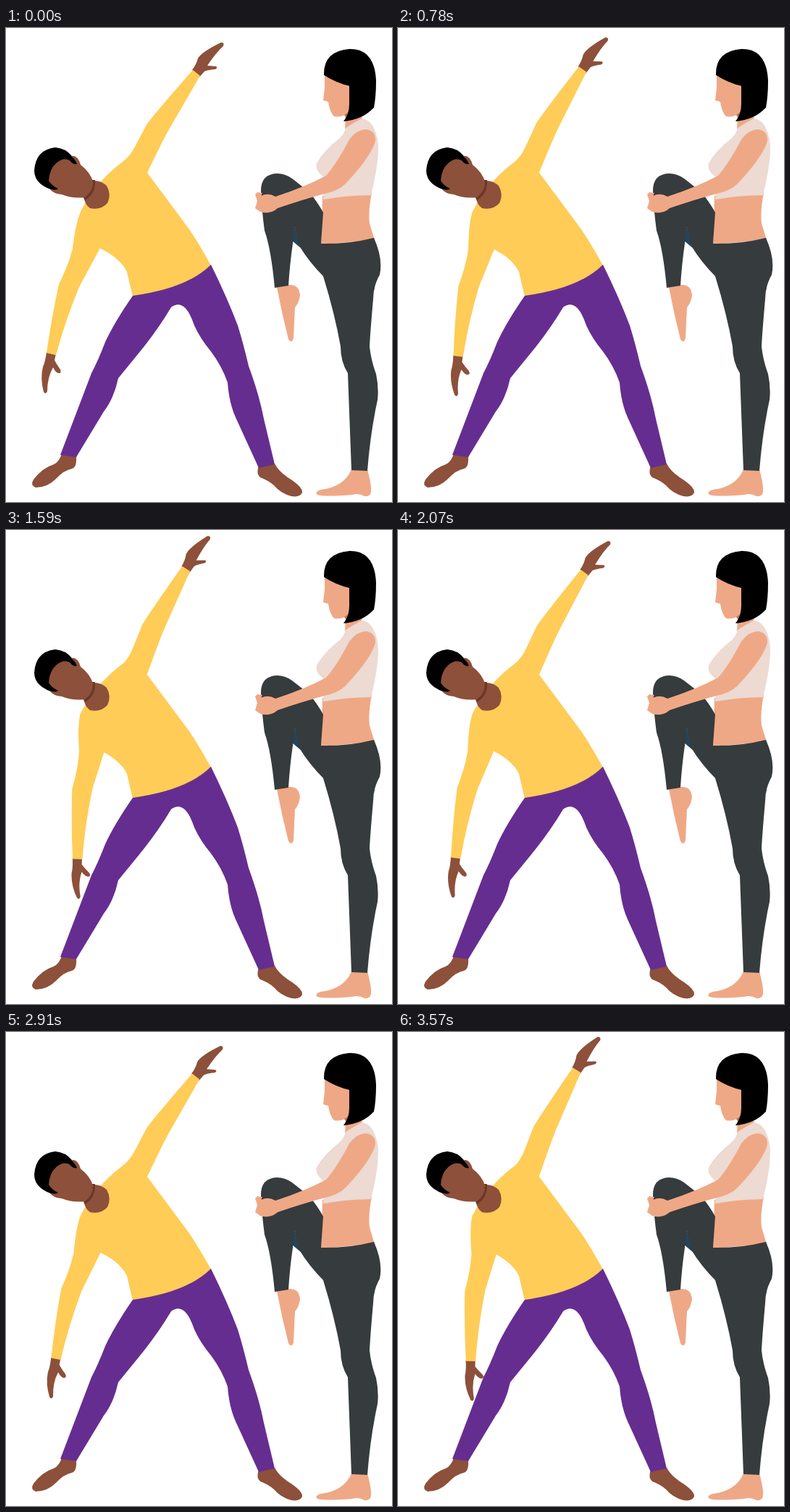
An HTML page that plays this animation: 533x655 px, repeating every 3600 ms.

```html
<!DOCTYPE html>
<html lang="en">
<head>
<meta charset="utf-8">
<title>Stretching</title>
<style>
  html, body { margin: 0; width: 100%; height: 100%; overflow: hidden; background: #fff; }
  svg { display: block; }
  .brown { fill: #8d503a; }
  .yellow { fill: #ffcc57; }
  .purple { fill: #662d91; }
  .skin { fill: #efa886; }
  .dark { fill: #363b3d; }
  .top { fill: #ecdad3; }
</style>
</head>
<body>
<svg width="533" height="655" viewBox="0 0 533 655">
  <g id="man">
    <g class="brown">
      <path d="M77 588L97 592Q98 607 91 609Q80 611 69 623Q57 635 41 635Q33 632 38 624Q50 608 66 603Q74 599 77 588Z"/>
      <path d="M349 605L371 602Q376 612 389 621Q410 634 409 642Q406 649 394 647Q379 643 370 632Q362 625 351 621Q345 616 349 605Z"/>
    </g>
    <g id="lowArm">
      <path class="brown" d="M56 448Q54 462 51 468Q47 484 52 503Q55 507 57 502Q57 483 65 469Q69 477 73 477Q77 477 75 472Q70 465 67 459L69 450Z"/>
      <path class="yellow" d="M118 238L103 254Q96 270 92 305Q86 328 73 354Q63 400 56 449L69 452Q82 404 101 358L130 304L140 280Z"/>
    </g>
    <g id="highArm">
      <path class="brown" d="M257 58Q263 50 265 42Q270 33 297 20Q302 20 300 25Q290 34 278 52L290 53Q293 55 289 57Q278 58 274 60L267 68Z"/>
      <path class="yellow" d="M150 196L162 184Q172 176 178 164L195 132Q215 107 258 58L268 66L228 135Q220 148 195 200L178 215Z"/>
    </g>
    <path class="yellow" d="M103 254Q107 243 133 210Q150 192 164 183L182 178L195 200L253 278Q267 299 283 328Q250 361 175 371Q171 355 167 337Q158 318 129 304L112 275Z"/>
    <path class="purple" d="M175 370Q250 360 283 327Q306 374 320 411Q328 437 335 467Q350 508 356 540L371 603L349 608L317 538Q308 518 306 490Q298 467 283 447Q268 429 260 411Q247 372 228 386Q212 413 190 441L155 484Q149 512 135 530Q123 550 97 593L75 590L118 477Q127 460 137 434Q150 406 175 370Z"/>
    <path class="brown" d="M119 211Q131 210 139 218Q146 230 140 242Q131 252 116 249Q109 244 107 233Z"/>
    <path d="M108 236Q122 228 121 210" fill="none" stroke="#6c3729" stroke-width="4"/>
    <path d="M71 226Q39 218 39 197Q41 168 68 165Q82 166 91 177L103 190Q99 201 71 226Z"/>
    <path class="brown" d="M59 211Q60 195 69 187Q79 178 88 183Q92 189 98 188Q96 182 90 177Q99 175 103 189Q116 199 120 212Q121 225 109 234Q92 236 77 230Q65 229 60 222Q68 225 72 222Q63 218 59 211Z"/>
  </g>
  <g id="woman">
    <g class="skin">
      <path d="M374 358L391 355Q405 354 406 370Q404 381 399 386L397 429Q394 437 390 430Q381 395 374 358Z"/>
      <path d="M477 610H499Q505 632 504 641Q503 648 495 647Q486 642 478 645Q440 648 430 645Q425 641 435 638Q467 634 477 610Z"/>
      <path d="M468 140L469 119L491 117L492 128Z"/>
      <path d="M440 60V82L438 100L445 102Q447 116 453 122Q461 124 470 119L478 112V70Z"/>
      <path d="M437 232L505 228Q500 253 502 270L509 293L435 299Z"/>
    </g>
    <path fill="#b9785c" d="M467 120L476 114L472 128Z"/>
    <path fill="#23445b" d="M397 270L407 304L395 294Z"/>
    <path class="dark" d="M352 225Q352 202 374 201Q385 201 395 208L418 226Q430 240 438 255L435 298L440 345Q418 323 405 301L398 274L396 298Q392 325 390 356L371 359Q366 305 357 280Q353 250 352 225Z"/>
    <path class="dark" d="M434 298Q472 299 508 290Q521 319 516 341Q507 357 507 375Q503 420 502 440Q504 459 511 478Q515 497 513 514Q503 560 499 612L477 611L472 477Q462 461 462 440Q454 395 438 343Z"/>
    <path class="top" d="M469 138Q480 131 491 125Q507 126 513 154Q517 179 504 231Q472 231 438 237L440 207Q426 197 429 187Q438 170 461 152Q467 146 469 138Z"/>
    <path class="skin" d="M474 154Q485 140 497 140Q511 142 510 156Q504 178 469 215Q459 225 440 229Q410 237 375 249Q365 258 351 254L344 249L347 239L344 230L347 227L354 228L352 232Q362 227 372 233Q412 220 442 204Q457 187 474 154Z"/>
    <path d="M439 65Q438 32 474 29Q509 28 511 73Q511 95 508 110Q492 127 466 129Q474 119 474 105V80Q456 76 439 65Z"/>
  </g>
</svg>
<script>
  const LOOP = 3600;
  const times = [0, 1460, 2640, LOOP];
  const arms = [
    { node: document.getElementById("highArm"), pivot: "175 194", angles: [0, -6.2, 1.1, -6.8] },
    { node: document.getElementById("lowArm"), pivot: "104 257", angles: [0, -10.9, 0.2, -11.1] }
  ];

  const ease = p => (1 - Math.cos(Math.PI * p)) / 2;

  function angleAt(angles, t) {
    const i = times.findIndex(end => t < end) - 1;
    const p = ease((t - times[i]) / (times[i + 1] - times[i]));
    return angles[i] + (angles[i + 1] - angles[i]) * p;
  }

  function draw() {
    const t = performance.now() % LOOP;
    for (const { node, pivot, angles } of arms) {
      node.setAttribute("transform", `rotate(${angleAt(angles, t)} ${pivot})`);
    }
    requestAnimationFrame(draw);
  }
  draw();
</script>
</body>
</html>
```
